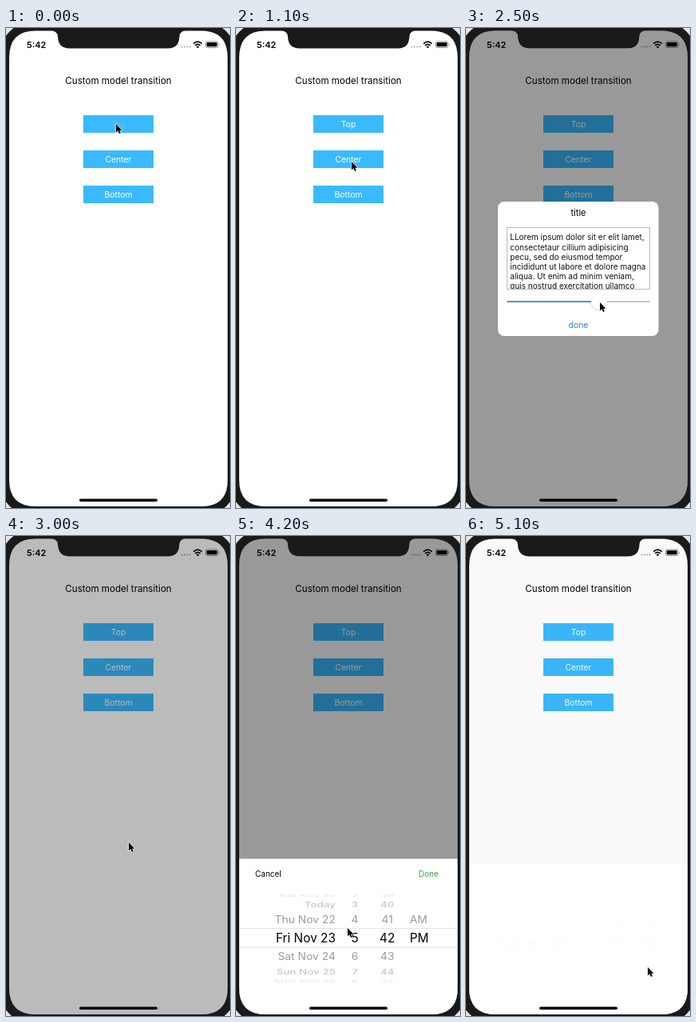
Write an HTML page that moves like this. It is 281 by 600 pixels and loops after 5200 ms.

```html
<!DOCTYPE html>
<html lang="en">
<head>
<meta charset="utf-8">
<title>Custom model transition</title>
<style>
html, body { margin: 0; width: 100%; height: 100%; overflow: hidden; background: #e4e4e4; }
svg { display: block; width: 281px; height: 600px; }
text { font-family: Inter, "Noto Sans", sans-serif; white-space: pre; }
</style>
</head>
<body>
<svg viewBox="0 0 281 600">
  <defs>
    <clipPath id="screen">
      <path d="M37 3.5H57Q64.5 3.5 65 11Q65.5 25.5 80 25.5H203Q217 25.5 217.5 11Q218 3.5 225 3.5H245Q278 3.5 278 37V565Q278 598 245 598H37Q4 598 4 565V37Q4 3.5 37 3.5Z"/>
    </clipPath>
    <clipPath id="page"><rect x="52" y="250" width="178" height="76"/></clipPath>
    <clipPath id="wheel"><rect x="4" y="446" width="274" height="114"/></clipPath>
  </defs>
  <rect x="-9" y="-9" width="299" height="620" rx="46" fill="#1a1a1a"/>
  <g clip-path="url(#screen)">
    <rect width="281" height="600" fill="#fff"/>
    <g id="status">
      <path d="M220.5 23.5H231" stroke="#aaa" stroke-width="2.2" stroke-linecap="round" stroke-dasharray="0 3.4"/>
      <path d="M235.2 19.6Q240.5 14.8 245.8 19.6M237.2 21.8Q240.5 18.8 243.8 21.8" fill="none" stroke="#000" stroke-width="1.6"/>
      <path d="M238.7 23.4Q240.5 21.8 242.3 23.4L240.5 25.3Z"/>
      <rect x="250.5" y="16.9" width="15.4" height="7.6" rx="2" fill="none" stroke="#777" stroke-width=".8"/>
      <rect x="251.7" y="18.1" width="13" height="5.2" rx="1"/>
      <path d="M267 19.3Q268.6 20.7 267 22.1Z" fill="#777"/>
    </g>
    <g id="menu"></g>
    <rect id="dim" width="281" height="600"/>
    <rect id="red" x="40" y="217" width="201.5" height="168" rx="8" fill="#f00"/>
    <g id="dialog">
      <rect x="40" y="217" width="201.5" height="168" rx="8" fill="#fff"/>
      <rect x="51.5" y="249.5" width="179" height="77" fill="#fff" stroke="#aaa" stroke-width=".8"/>
      <g id="lorem" clip-path="url(#page)"></g>
      <path d="M51.5 342H230.5" stroke="#b4b4b4" stroke-width="1.5"/>
      <path id="fill" stroke="#2a80dc" stroke-width="1.5"/>
      <g id="knob">
        <circle cy="1.5" r="10.6" opacity=".1"/>
        <circle r="10" fill="#fff"/>
      </g>
    </g>
    <g id="sheet">
      <rect y="403.5" width="281" height="200" fill="#fff"/>
      <g id="picker">
        <path d="M4 490.5H278M4 514.5H278" stroke="#ddd" stroke-width=".8"/>
        <g id="rows" clip-path="url(#wheel)"></g>
      </g>
    </g>
    <rect x="92" y="588.4" width="98" height="3.6" rx="1.8"/>
  </g>
  <g id="cursor">
    <g id="press" fill="none">
      <circle r="16.3" stroke="#fff" stroke-width="2.8" opacity=".45"/>
      <circle r="16.3" stroke="#000" stroke-width="1.3"/>
    </g>
    <path d="M0 1V11.5L2.4 9.3L4 13L5.8 12.2L4.3 8.7H7.5Z" stroke="#fff" stroke-width="1.2" stroke-linejoin="round" paint-order="stroke"/>
  </g>
</svg>
<script>
const LOOP = 5200, STEP = 100;
const $ = id => document.getElementById(id);

function set(node, attrs) {
  for (const key in attrs) node.setAttribute(key, attrs[key]);
  return node;
}

function add(parent, tag, attrs) {
  return $(parent).appendChild(set(document.createElementNS("http://www.w3.org/2000/svg", tag), attrs));
}

// Text placed by its vertical middle.
function write(parent, label, x, mid, size, fill = "#000", anchor = "middle") {
  const node = add(parent, "text", { x, y: mid + size * .36, "font-size": size, fill, "text-anchor": anchor });
  node.textContent = label;
  return node;
}

set(write("status", "5:42", 26, 21, 10.9, "#000", "start"), { "font-weight": 600 });
write("menu", "Custom model transition", 141, 66, 11.6);

const buttons = ["Top", "Center", "Bottom"].map((label, i) => {
  const y = 109 + 44 * i;
  add("menu", "rect", { x: 97, y, width: 88, height: 22, fill: "#3bb9ff" });
  return write("menu", label, 141, y + 11.3, 10.4, "#fff");
});

write("dialog", "title", 141, 231.5, 11);
const done = write("dialog", "done", 141, 371, 10.4, "#2a80dc");
`LLorem ipsum dolor sit er elit lamet,
consectetaur cillium adipisicing
pecu, sed do eiusmod tempor
incididunt ut labore et dolore magna
aliqua. Ut enim ad minim veniam,
quis nostrud exercitation ullamco`.split("\n").forEach((line, i) =>
  write("lorem", line, 55.3, 261.7 + 12.2 * i, 10, "#111", "start"));

write("picker", "Cancel", 24, 422, 10, "#000", "start");
const sheetDone = write("picker", "Done", 254, 422, 10, "#3fa24c", "end");

const DAYS = ["Sun", "Mon", "Tue", "Wed", "Thu", "Fri", "Sat"];
const columns = [
  { x: 125, anchor: "end", label: i => i ? `${DAYS[(i + 10) % 7]} Nov ${21 + i}` : "Today" },
  { x: 149, anchor: "middle", label: String, at: 5 },
  { x: 189.7, anchor: "middle", label: String, at: 42 },
  { x: 218, anchor: "start", label: i => ["AM", "PM"][i] || "", at: 1 }
];
for (const col of columns) {
  col.rows = Array.from({ length: 7 }, () => add("rows", "text", { "text-anchor": col.anchor }));
}

// Rows sit on a drum seen from the front.
function spin(col, at) {
  col.rows.forEach((row, n) => {
    const i = Math.round(at) + n - 3, turn = (i - at) * .42, far = Math.abs(i - at);
    const size = far < .5 ? 15.4 : 14.2 - far * .3;
    const grey = far < .5 ? 0 : Math.min(235, 118 + 36 * far);
    row.textContent = col.label(i);
    set(row, {
      transform: `translate(${col.x} ${502.8 + 56.3 * Math.sin(turn)}) scale(1 ${Math.max(0, Math.cos(turn))})`,
      y: size * .36, "font-size": size, fill: `rgb(${grey},${grey},${grey})`
    });
  });
}

const ramp = (t, from, to) => Math.min(1, Math.max(0, (t - from) / (to - from)));
const ease = (t, from, to) => {
  const k = ramp(t, from, to);
  return k * k * (3 - 2 * k);
};

// Drops in on a damped spring, later falls out below.
function redY(t) {
  const s = Math.max(0, t - 100) / 1000;
  return -400 * Math.exp(-12 * s) * Math.cos(12 * s) + 400 * ease(t, 600, 1100);
}

const dimAt = t => .4 * (
  ramp(t, 0, 300) - ramp(t, 600, 1100) +
  ramp(t, 1300, 1600) - ramp(t, 2900, 3200) +
  ramp(t, 3400, 3700) - ramp(t, 4800, 5120));

// Cursor rests: arrive, leave, x, y.
const rests = [
  [0, 100, 138, 119], [500, 600, 224, 141], [1100, 1400, 145, 166],
  [1900, 1900, 142, 342], [2500, 2500, 168, 342], [2800, 3000, 154, 382],
  [3400, 3500, 143, 211], [3900, 4000, 140, 545], [4200, 4300, 140, 489],
  [4800, 4900, 241, 423], [5100, 5200, 228, 538]
];

function cursorAt(t) {
  const i = rests.findLastIndex(rest => rest[0] <= t);
  const [, leave, x, y] = rests[i];
  const [arrive, , nx, ny] = rests[i + 1] || rests[i];
  const k = arrive > leave ? ease(t, leave, arrive) : 0;
  const sway = 75 * Math.sin(Math.PI * ramp(t, 1900, 2500));
  return [x + (nx - x) * k + sway, y + (ny - y) * k];
}

const during = (t, from, to) => t >= from && t < to;
const pressed = t =>
  [500, 1300, 2800, 3400, 4800].some(tap => during(t, tap, tap + 100)) ||
  during(t, 1900, 2500) || during(t, 4000, 4200);

const labels = [[buttons[0], 0], [buttons[1], 1300], [buttons[2], 3400], [done, 2800], [sheetDone, 4800]];

function draw(t) {
  const knob = Math.min(220, cursorAt(Math.min(2500, Math.max(1900, t)))[0] - 1);
  set($("dim"), { opacity: dimAt(t) });
  set($("red"), { transform: `translate(0 ${redY(t)})` });
  set($("dialog"), { opacity: ramp(t, 1300, 1600) - ramp(t, 2800, 3000) });
  set($("knob"), { transform: `translate(${knob} 342)` });
  set($("fill"), { d: `M51.5 342H${knob}` });
  set($("sheet"), { transform: `translate(0 ${200 - 200 * ease(t, 3400, 3900) + 6.5 * ramp(t, 4800, 5100)})` });
  set($("picker"), { opacity: 1 - ramp(t, 4800, 5105) });
  const day = 2 * ease(t, 4000, 4200) + 2 * ease(t, 4300, 4500);
  for (const col of columns) spin(col, col.at ?? day);
  for (const [label, tap] of labels) set(label, { opacity: during(t, tap, tap + 100) ? .2 : 1 });
  set($("cursor"), { transform: `translate(${cursorAt(t)})` });
  set($("press"), { opacity: pressed(t) ? 1 : 0 });
}

let start = null;
function tick(now) {
  start ??= now;
  draw(Math.floor((now - start) % LOOP / STEP) * STEP);
  requestAnimationFrame(tick);
}
draw(0);
requestAnimationFrame(tick);
</script>
</body>
</html>
```
